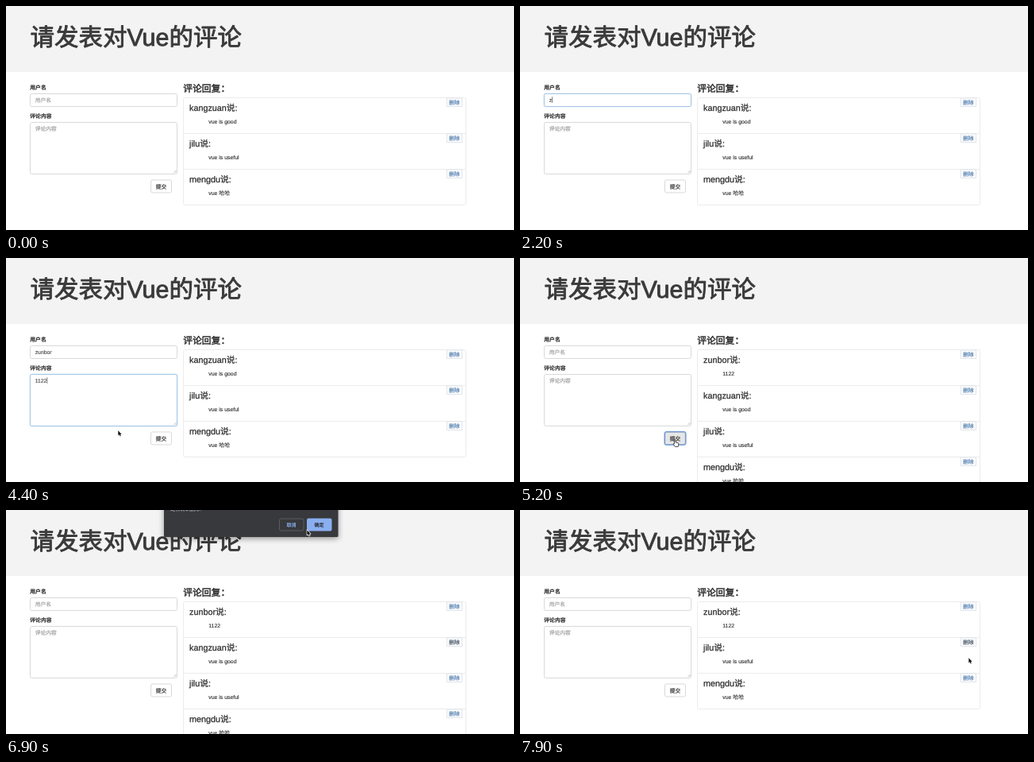
An HTML page with a canvas that plays this animation: 640x282 px, repeating every 8 s.

```html
<!DOCTYPE html>
<html lang="zh">
<head>
<meta charset="utf-8">
<style>
html, body { margin: 0; width: 100%; height: 100%; overflow: hidden; background: #fff; }
canvas { display: block; width: 640px; height: 282px; }
</style>
</head>
<body>
<canvas id="stage" width="640" height="282"></canvas>
<script>
const ctx = document.getElementById('stage').getContext('2d');
const LOOP = 8000, STEP = 100;
const SANS = '"Liberation Sans", "Noto Sans CJK SC", "Noto Sans CJK", sans-serif';
const INK = '#2b2b2b', MUTED = '#959595', LINK = '#4f7bad', EDGE = '#d9d9d9', RULE = '#ececec';

const NEW_USER = 'zunbor', NEW_TEXT = '1122';
const COMMENTS = [
  ['kangzuan', 'vue is good'],
  ['jilu', 'vue is useful'],
  ['mengdu', 'vue 哈哈'],
];
const USER_KEYS = [2200, 2400, 2500, 2600, 2800, 2900];
const TEXT_KEYS = [3600, 3800, 4000, 4100];
const SUBMIT = 5000, REMOVE = 7300;

// Pointer paths: [time, x, y]; the pointer hides while typing.
const PATHS = [
  { end: 2200, keys: [[100, 275, 35], [400, 120, 95], [500, 45, 138], [700, 83, 116]] },
  { end: 3600, keys: [[3100, 83, 117], [3400, 80, 172]] },
  { end: LOOP, keys: [
    [4200, 82, 176], [4400, 141, 217], [4700, 192, 227], [4800, 195, 229], [5300, 195, 229],
    [5400, 410, 188], [5500, 571, 160], [5600, 571, 160], [5700, 575, 153], [5900, 570, 163],
    [6100, 568, 167], [6400, 568, 167], [6700, 415, 60], [6900, 379, 25], [7100, 391, 20],
    [7300, 391, 20], [7500, 450, 90], [7700, 545, 172], [7900, 565, 186]] },
];

const clamp = v => Math.max(0, Math.min(1, v));
const ramp = (t, start, length) => clamp((t - start) / length);
const typed = (text, keys, t) => text.slice(0, keys.filter(k => t >= k).length);

// A thin outline stands in for the medium weight.
function label(text, x, y, size, color = INK, { weight = 400, outline = .12 } = {}) {
  ctx.font = `${weight} ${size}px ${SANS}`;
  ctx.fillStyle = ctx.strokeStyle = color;
  ctx.lineWidth = outline;
  ctx.lineJoin = 'round';
  ctx.fillText(text, x, y);
  ctx.strokeText(text, x, y);
  return ctx.measureText(text).width;
}

function box(x, y, w, h, r, fill, stroke) {
  ctx.beginPath();
  ctx.roundRect(x, y, w, h, r);
  if (fill) { ctx.fillStyle = fill; ctx.fill(); }
  if (stroke) { ctx.strokeStyle = stroke; ctx.lineWidth = 1; ctx.stroke(); }
}

function line(color, width, ...points) {
  ctx.strokeStyle = color;
  ctx.lineWidth = width;
  ctx.beginPath();
  points.forEach(([x, y], i) => i ? ctx.lineTo(x, y) : ctx.moveTo(x, y));
  ctx.stroke();
}

function field(y, h, baseline, text, hint, focus) {
  box(30.5, y, 185, h, 2, '#fff', EDGE);
  if (focus > 0) {
    ctx.save();
    ctx.globalAlpha = focus;
    ctx.shadowColor = 'rgba(102,175,233,.35)';
    ctx.shadowBlur = 3;
    box(30.5, y, 185, h, 2, '#fff');
    ctx.restore();
    ctx.save();
    ctx.globalAlpha = focus;
    box(30.5, y, 185, h, 2, null, '#a4c5e3');
    ctx.restore();
  }
  const width = text ? label(text, 36.7, baseline, 6.8, '#444') : 0;
  if (!text) label(hint, 36.7, baseline, 6.8, MUTED);
  if (focus >= 1) line('#444', .7, [37.2 + width, baseline - 6.3], [37.2 + width, baseline + 1.3]);
}

function drawForm(t) {
  const open = t < SUBMIT;
  const user = open ? typed(NEW_USER, USER_KEYS, t) : '';
  const text = open ? typed(NEW_TEXT, TEXT_KEYS, t) : '';
  const userFocus = ramp(t, 1600, 200) * (1 - ramp(t, 3300, 200));
  const textFocus = ramp(t, 3300, 200) * (1 - ramp(t, 4800, 200));

  label('用户名', 30.3, 104.9, 6.8, INK, { weight: 700 });
  field(110.5, 16, 120.6, user, '用户名', userFocus);
  label('评论内容', 30.3, 141.2, 6.8, INK, { weight: 700 });
  field(146.5, 65, 156.6, text, '评论内容', textFocus);
  line('#999', .6, [211.5, 210], [214.5, 207]);
  line('#999', .6, [213.3, 210], [214.5, 208.8]);

  const hover = t >= 4700 && t < 5400;
  const focused = t >= 4900 && t < 6100;
  const active = hover || focused;
  box(182.5, 219, 26, 16, 2, active ? '#e6e6e6' : '#fff', active ? '#b5b5b5' : EDGE);
  if (focused) {
    box(181.9, 218.4, 27.2, 17.2, 2.5, null, '#7ba6e0');
    box(182.7, 219.2, 25.6, 15.6, 2, null, 'rgba(70,120,200,.5)');
  }
  label('提交', 188.8, 229.6, 6.8, INK, { outline: .2 });
}

function drawComments(t) {
  let items = COMMENTS;
  if (t >= SUBMIT) items = [[NEW_USER, NEW_TEXT], ...items];
  if (t >= REMOVE) items = items.filter((_, i) => i !== 1);

  label('评论回复：', 223.2, 108.2, 11.8, INK, { outline: .45 });
  box(223.5, 115.5, 356, 45 * items.length, 2, '#fff', RULE);
  items.forEach(([name, text], i) => {
    const y = 115.5 + 45 * i;
    if (i) line(RULE, 1, [223.5, y], [579.5, y]);
    label(name + '说:', 231, y + 16.2, 10.8, INK, { outline: .25 });
    label(text, 255.3, y + 32.3, 6.88);
    box(555.5, y + .5, 19, 10.5, 0, '#fff', '#dfe4ea');
    label('删除', 558, y + 8.4, 6.8, i === 1 && t >= 5900 ? '#3f4e60' : LINK, { outline: .15 });
  });
}

function drawDialog(t) {
  const alpha = ramp(t, 6200, 200) * (1 - ramp(t, 7100, 200));
  if (!alpha) return;
  ctx.save();
  ctx.globalAlpha = alpha;
  ctx.save();
  ctx.shadowColor = 'rgba(0,0,0,.4)';
  ctx.shadowBlur = 7;
  ctx.shadowOffsetY = 2;
  box(199, -20, 219.5, 54, 1.5, '#37393c');
  ctx.restore();
  label('是否确认删除?', 207, .8, 6.2, '#b6b8ba');
  box(344.5, 11, 30.5, 15, 2, null, '#5a5d62');
  label('取消', 353.6, 20.9, 6, '#8ab4f8', { outline: .2 });
  box(379, 10.5, 31.5, 16, 2, '#8aaff0');
  label('确定', 388.6, 20.9, 6, '#25282d', { outline: .2 });
  ctx.restore();
}

function pointerAt(t) {
  const path = PATHS.find(p => t >= p.keys[0][0] && t < p.end);
  if (!path) return null;
  const next = path.keys.findIndex(k => k[0] > t);
  if (next < 0) return path.keys.at(-1).slice(1);
  const [a, b] = [path.keys[next - 1], path.keys[next]];
  const k = (t - a[0]) / (b[0] - a[0]);
  return [a[1] + (b[1] - a[1]) * k, a[2] + (b[2] - a[2]) * k];
}

const ARROW = new Path2D('M.3 .3V6.6L1.7 5.3L2.7 7.6L3.8 7.1L2.8 4.9H4.7Z');
const HAND = new Path2D('M-.6 0Q.3-.9 1 .2V3L4 3.7Q5 4 4.8 5.2L4.2 8.6H.3L-2 5.2Q-2 4.2-.6 5Z');

function drawPointer(t) {
  const point = pointerAt(t);
  if (!point) return;
  const [x, y] = point;
  const inField = x > 31 && x < 215 && ((y > 110 && y < 127) || (y > 146 && y < 211));
  const onButton = x > 182 && x < 209 && y > 219 && y < 235;
  ctx.save();
  ctx.translate(x, y);
  ctx.lineJoin = 'round';
  if (inField) {
    line('#555', .8, [0, -4], [0, 4]);
    line('#555', .7, [-1.5, -4.4], [1.5, -4.4]);
    line('#555', .7, [-1.5, 4.4], [1.5, 4.4]);
  } else if (onButton) {
    ctx.fillStyle = '#fff';
    ctx.strokeStyle = '#222';
    ctx.lineWidth = .8;
    ctx.fill(HAND);
    ctx.stroke(HAND);
  } else {
    ctx.strokeStyle = '#fff';
    ctx.lineWidth = 1.3;
    ctx.stroke(ARROW);
    ctx.fillStyle = '#111';
    ctx.fill(ARROW);
  }
  ctx.restore();
}

function draw(t) {
  ctx.textRendering = 'geometricPrecision';
  ctx.fillStyle = '#fff';
  ctx.fillRect(0, 0, 640, 282);
  ctx.fillStyle = '#f3f3f3';
  ctx.fillRect(0, 0, 640, 83);
  label('请发表对Vue的评论', 30.4, 49.5, 30.5, '#3a3a3a', { outline: .9 });
  drawForm(t);
  drawComments(t);
  drawDialog(t);
  drawPointer(t);
}

const start = performance.now();
function tick() {
  const t = (performance.now() - start) % LOOP;
  draw(Math.floor(t / STEP) * STEP);
  requestAnimationFrame(tick);
}
tick();
</script>
</body>
</html>
```
